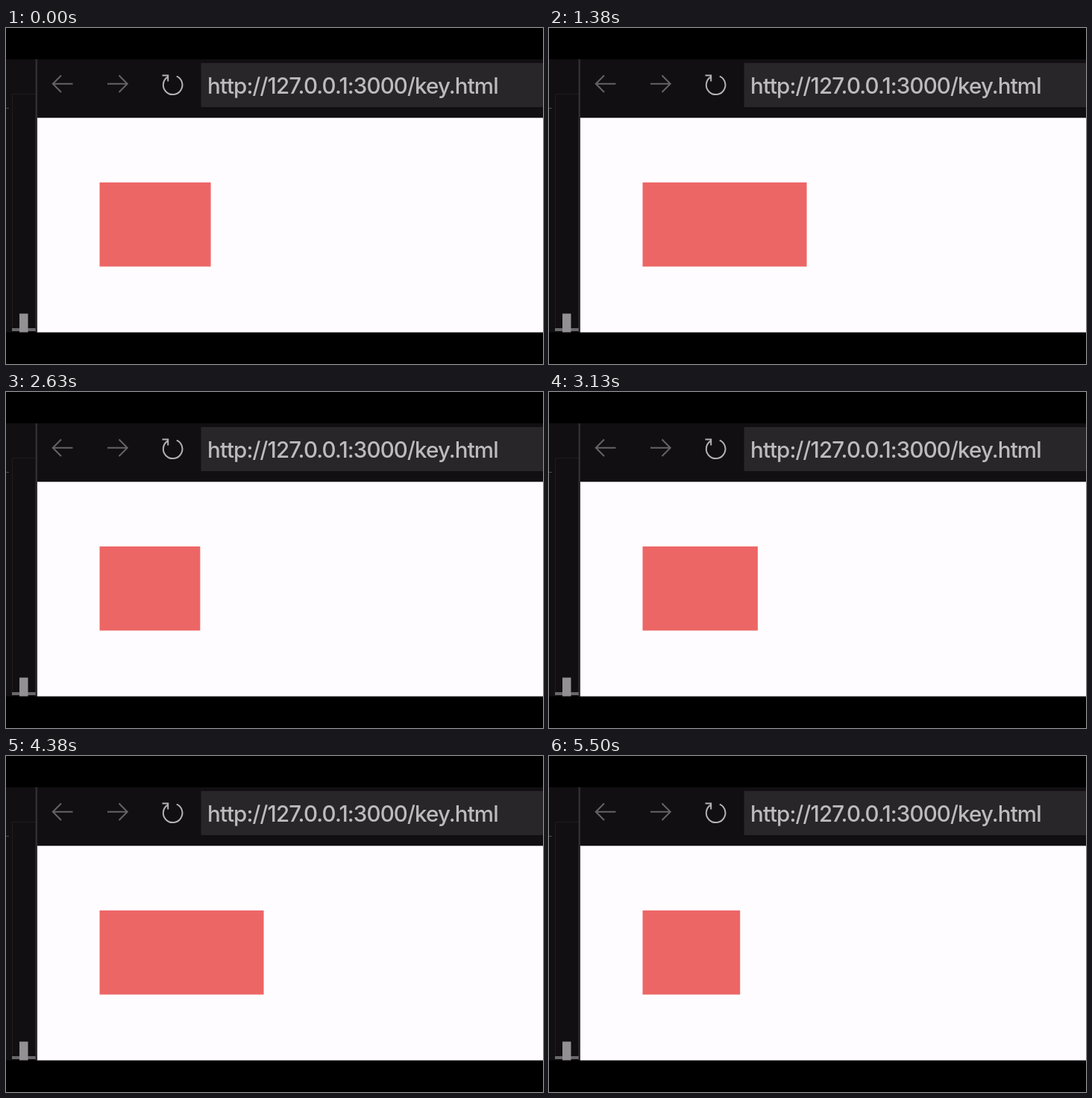
These frames come from a looping animation (720 px wide and 450 px high, 5630 ms). An HTML page:

```html
<!DOCTYPE html>
<html lang="en">
<head>
<meta charset="utf-8">
<title>Growing box</title>
<style>
  html, body { margin: 0; width: 100%; height: 100%; overflow: hidden; background: #000; }
  svg { display: block; width: 720px; height: 450px; }
  .icon { fill: none; stroke: #656367; stroke-width: 2; }
  .reload { stroke: #b3b1b4; }
  .address {
    font: 500 29.5px Inter, "Liberation Sans", sans-serif;
    font-feature-settings: "calt" 0;
    letter-spacing: -0.87px;
    fill: #bdbbbe;
  }
</style>
</head>
<body>
<svg viewBox="0 0 720 450">
  <rect y="42" width="720" height="365.5" fill="#110f12"/>

  <!-- side panel -->
  <path d="M8.5 407V88.5H39" fill="none" stroke="#1e1c1f"/>
  <path d="M0 107.5H4" stroke="#4a484b"/>
  <rect x="8" y="402" width="32" height="4" fill="#69686a"/>
  <rect x="18" y="382.5" width="11.5" height="25" fill="#929093"/>
  <rect x="39.5" y="42" width="2.5" height="365.5" fill="#302e31"/>

  <!-- toolbar -->
  <path class="icon" d="M89.5 74.7H63M74 63.5L62.8 74.7L74 86"/>
  <path class="icon" d="M136 74.7H162.5M151.5 63.5L162.7 74.7L151.5 86"/>
  <path class="icon reload" d="M228.8 64.6A12.8 12.8 0 1 1 216.6 65.6M209.5 63.5H217.2V71.5"/>
  <rect x="261.5" y="47" width="458.5" height="59" fill="#282629"/>
  <text class="address" x="270" y="88">http://127.0.0.1:3000/key.html</text>

  <!-- page -->
  <rect x="42" y="120.3" width="678" height="287.3" fill="#fefcff"/>
  <rect id="box" x="125.5" y="206.8" width="149" height="112.7" fill="#ed6666"/>
</svg>
<script>
  const LOOP = 5630, STEP = 125, LAST_STEP = 44;
  const CYCLE = 3000, CYCLE_START = 1492;
  const MIN_WIDTH = 112.5, GROWTH = 115;
  const box = document.getElementById("box");

  // cubic-bezier(.42, 0, 1, 1), solved by bisection
  function easeIn(x) {
    let low = 0, high = 1;
    for (let i = 0; i < 24; i++) {
      const s = (low + high) / 2;
      const bezierX = 1.26 * s * (1 - s) ** 2 + s * s * (3 - 2 * s);
      if (bezierX < x) low = s; else high = s;
    }
    return low * low * (3 - 2 * low);
  }

  function draw() {
    const step = Math.min(LAST_STEP, Math.floor(performance.now() % LOOP / STEP));
    const phase = (step * STEP - CYCLE_START + CYCLE) % CYCLE / CYCLE;
    box.setAttribute("width", MIN_WIDTH + GROWTH * easeIn(phase));
    requestAnimationFrame(draw);
  }
  draw();
</script>
</body>
</html>
```
